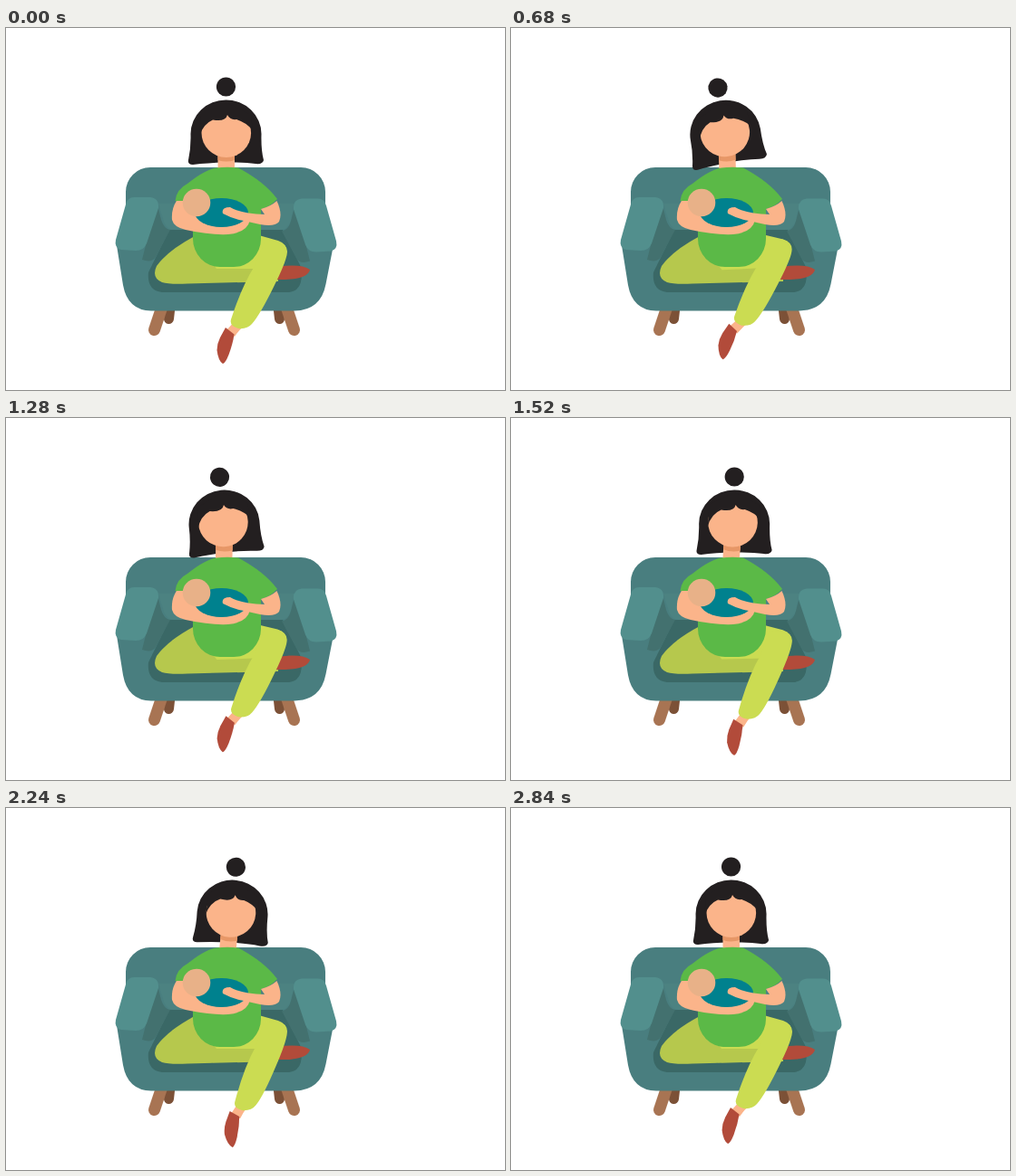
Recreate the animation shown at these times as an HTML page. Size 550 px wide and 400 px high, loop 2880 ms.

```html
<!DOCTYPE html>
<html lang="en">
<head>
<meta charset="utf-8">
<title>Mother and baby</title>
<style>
  html, body { margin: 0; width: 100%; height: 100%; overflow: hidden; background: #fff; }
  svg { display: block; width: 100%; height: 100%; }
  .skin { fill: #fbb48a; }
  .hair { fill: #231f20; }
  .lime { fill: #cbdc52; }
  .shoe { fill: #b24b3a; }
  .legs { stroke-linecap: round; }
</style>
</head>
<body>
<svg viewBox="0 0 550 400">
  <defs>
    <g id="sofaLeg" class="legs">
      <path d="M181 308L179.500 321.500" stroke="#7c5137" stroke-width="11"/>
      <path d="M172 308L163.500 333.500" stroke="#a87453" stroke-width="13"/>
    </g>
    <g id="armrest">
      <path d="M166 192L171 212Q174 222 181 223L165 253Q161 260 150 256Z" fill="#43716f"/>
      <path d="M141 187H159Q169 188 168 199L155 238Q152 246 143 246L127 245Q119 243 121 234L132 195Q134 187 141 187Z" fill="#528f8d"/>
    </g>
  </defs>

  <g id="sofa">
    <use href="#sofaLeg"/>
    <use href="#sofaLeg" transform="matrix(-1 0 0 1 481 0)"/>
    <path d="M132 181A27 27 0 0 1 159 154H325A27 27 0 0 1 352 181V200L360.500 242L352.500 283Q347 312 318 312.500H160Q134 312 129 284L122 240L132 200Z" fill="#497e7f"/>
    <path d="M168 194L174 214Q177 223 186 223H302Q311 223 314 213L318 194Z" fill="#4c8281"/>
    <path d="M180 223H305L325 264Q329 290 312 292H172Q155 290 157 270Z" fill="#3a6866"/>
    <use href="#armrest"/>
    <use href="#armrest" transform="matrix(-1 0 0 1 485 1.500)"/>
  </g>

  <g class="hair" id="backHair">
    <circle cx="242.500" cy="65" r="10.600"/>
    <path d="M203.500 117A39 37.500 0 0 1 281.500 117Q281 135 284 146Q283 151 275 150Q262 148 242 148.500Q222 149 206 151Q200 151 201 146Q204 132 203.500 117Z"/>
  </g>
  <g id="neck">
    <path class="skin" d="M233.500 132H252V165H233.500Z"/>
    <path d="M233.500 138H252V146Q243 149 233.500 146Z" fill="#e79767"/>
  </g>
  <ellipse id="face" class="skin" cx="242.800" cy="116" rx="27.300" ry="27"/>
  <path id="fringe" class="hair" d="M213 120Q217 106 228 101.500Q242 104 244 96Q247 102 254 101Q264 104 272 113L270 96L243 82L215 96Z"/>

  <path d="M208 230Q178 246 166 263Q160 276 172 281Q180 283.500 200 282.500L300 280V262L270 240Z" fill="#b6c84d"/>
  <path class="shoe" d="M298 264Q325 260 335 267Q333 277 308 278L296 278Z"/>
  <g id="thigh">
    <path class="lime" d="M229 262V240L275 228L300 235Q311 239 309 250Q306 262 285 266H232Z"/>
    <g id="calf">
      <g id="foot">
        <path class="skin" d="M252 324L262 329Q256 335 252 341L243 334Z"/>
        <path class="shoe" d="M242 331L251.500 338.500Q250 349 245.500 361Q242 370 239 371Q234 368 232.500 356Q232.500 349 236 342Z"/>
      </g>
      <path class="lime" d="M310 247Q310 256 296 284Q280 317 271 327Q266 333 256 332Q246 329 248 322Q260 285 274 263L285 236L300 236Q310 239 310 247Z"/>
    </g>
  </g>

  <path d="M232 154.500Q244 153 256 154.500Q285 170 299 189Q292 197 281 200V233A30 31 0 0 1 251 264H236A30 31 0 0 1 206 233V195L186.500 191Q188 178 200 172Q220 156 232 154.500Z" fill="#5bb947"/>
  <path class="skin" d="M188 191Q182 200 183 212Q185 220 198 223Q225 229 245 228Q266 226 269 212Q268 206 262 205Q250 222 230 219L208 207L206 191Z"/>
  <ellipse cx="237.500" cy="204" rx="29.500" ry="16" fill="#00818e"/>
  <circle cx="210" cy="193" r="15.300" fill="#e8b188"/>
  <path class="skin" d="M281 200Q292 197 298.500 191Q305 205 301 214Q296 220 280 217L262 213Q250 211 239 205Q237 198 247 198Q258 205 285 206Z"/>
</svg>
<script>
  const LOOP = 2880, STEP = 40, LEFT_AT = 880, RIGHT_AT = 1940;

  // Pivot, then [angle, dx, dy] at the left and right ends of the sway.
  const hair = { pivot: [242, 150], left: [-10.5, -1, 0], right: [5.5, 6, 0] };
  const parts = {
    backHair: hair,
    fringe: hair,
    neck: { pivot: [243, 147], left: [-2, -5, 0], right: [7, 3.3, 0] },
    face: { pivot: [243, 116], left: [-6, -8, -1], right: [5, 6.7, -0.3] },
    thigh: { pivot: [260, 255], left: [-3, 0, 0], right: [0, 0, 0] },
    calf: { pivot: [290, 248], left: [4.2, 0, -1.5], right: [-4.2, 0, 0.5] },
    foot: { pivot: [252, 333], left: [5, 0, 0], right: [-7, 0, 0] }
  };

  const ease = (t, from, to) =>
    (1 - Math.cos(Math.PI * Math.min(1, Math.max(0, (t - from) / (to - from))))) / 2;

  function draw(now) {
    const t = Math.floor((now % LOOP) / STEP) * STEP;
    const turn = ease(t, LEFT_AT, RIGHT_AT);
    const leftWeight = ease(t, 0, LEFT_AT) - turn;
    const rightWeight = turn - ease(t, RIGHT_AT, LOOP);
    for (const [id, { pivot, left, right }] of Object.entries(parts)) {
      const [angle, dx, dy] = left.map((v, i) => v * leftWeight + right[i] * rightWeight);
      document.getElementById(id).setAttribute("transform",
        `translate(${dx} ${dy}) rotate(${angle} ${pivot})`);
    }
  }

  const start = performance.now();
  function tick() {
    draw(performance.now() - start);
    requestAnimationFrame(tick);
  }
  tick();
</script>
</body>
</html>
```
